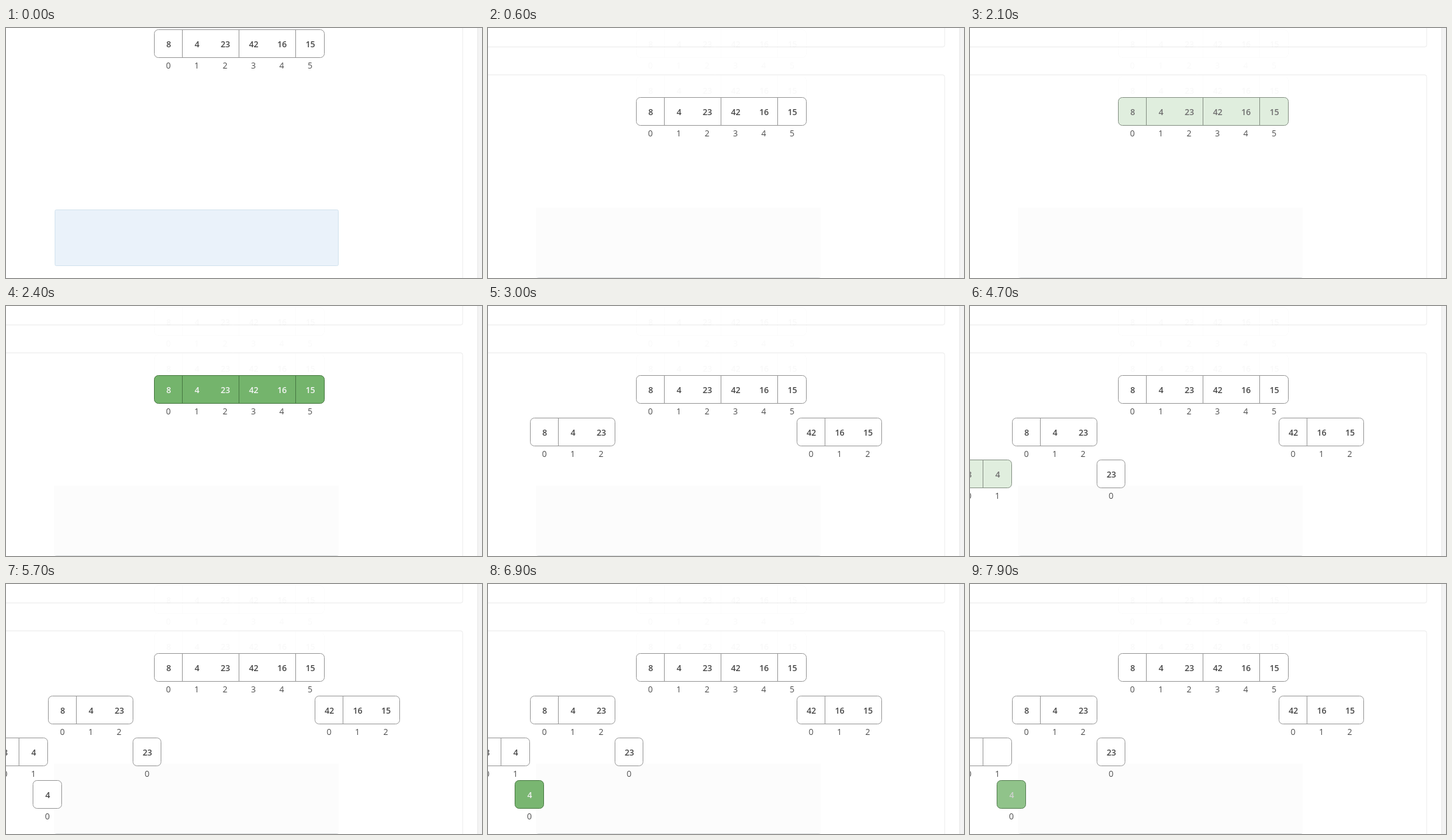
Write an HTML page with a canvas that moves like this. It is 714x376 px and loops after 8 s.

```html
<!DOCTYPE html>
<html lang="en">
<head>
<meta charset="utf-8">
<title>Merge sort</title>
<style>
  html, body { margin: 0; width: 100%; height: 100%; overflow: hidden; background: #fff; }
  canvas { display: block; }
</style>
</head>
<body>
<canvas id="stage" width="714" height="376"></canvas>
<script>
const ctx = document.getElementById('stage').getContext('2d');
const LOOP = 8000, CELL = 42.5;
const WHITE = [255, 255, 255], GREEN = [109, 176, 101];
const INK = [68, 68, 68], GRAY = [155, 155, 155], DARK_GREEN = [70, 122, 64];

// Each highlight is [start, end] of the fade in, then [start, end] of the fade out.
const arrays = [
  { values: [8, 4, 23, 42, 16, 15], x: 222.5, y: 104.5, shown: [-2, -1], lit: [2050, 2500, 2650, 3000] },
  { values: [8, 4, 23], x: 63.5, y: 168.5, shown: [2650, 3000], lit: [3250, 3700, 4150, 4400] },
  { values: [42, 16, 15], x: 463.5, y: 168.5, shown: [2650, 3000] },
  { values: [8, 4], x: -22.5, y: 231.5, shown: [4150, 4400], lit: [4650, 5100, 5450, 5700], emptied: [7250, 7600] },
  { values: [23], x: 190.5, y: 231.5, shown: [4150, 4400] },
  { values: [4], x: 40.95, y: 295.5, shown: [5450, 5700], lit: [6650, 7000, 7850, 8250] }
];

function ease(t, start, end) {
  const p = Math.min(1, Math.max(0, (t - start) / (end - start)));
  return 1 - (1 - p) ** 2;
}

const mix = (a, b, p) => `rgb(${a.map((v, i) => Math.round(v + (b[i] - v) * p))})`;

function roundedBox(x, y, w, h, r, fill, stroke) {
  ctx.beginPath();
  ctx.roundRect(x, y, w, h, r);
  ctx.fillStyle = fill;
  ctx.fill();
  ctx.strokeStyle = stroke;
  ctx.stroke();
}

function drawArray(item, y, alpha, glow, textAlpha) {
  if (alpha <= 0) return;
  const { values, x } = item;
  const edge = i => Math.floor(x + CELL * i - (i ? 0.1 : 0)) + 0.5;
  const left = edge(0);
  ctx.globalAlpha = alpha;
  roundedBox(left, y, edge(values.length) - left, 42, 6,
    mix(WHITE, GREEN, glow), mix(GRAY, DARK_GREEN, glow));

  ctx.beginPath();
  for (let i = 1; i < values.length; i += 2) {
    ctx.moveTo(edge(i), y);
    ctx.lineTo(edge(i), y + 42);
  }
  ctx.stroke();

  values.forEach((value, i) => {
    const center = x + CELL * (i + 0.5);
    ctx.font = '600 12.5px "Open Sans", sans-serif';
    ctx.fillStyle = mix(INK, WHITE, glow);
    ctx.globalAlpha = alpha * textAlpha;
    ctx.fillText(value, center + 0.3, y + 26.5);
    ctx.font = '12.5px "Open Sans", sans-serif';
    ctx.fillStyle = '#4c4c4c';
    ctx.globalAlpha = alpha;
    ctx.fillText(i, center - 0.2, y + 58);
  });
  ctx.globalAlpha = 1;
}

function drawPage(scroll) {
  ctx.fillStyle = '#fff';
  ctx.fillRect(0, 0, 714, 376);
  ctx.fillStyle = '#f3f3f3';
  ctx.fillRect(707, 0, 7, 376);
  ctx.fillStyle = '#e8e8e8';
  ctx.fillRect(707, 0, 1, 376);
  roundedBox(-20, scroll - 273.5, 705, 200, 3, '#fff', '#ebebeb');
  roundedBox(-20, scroll - 31.5, 705, 500, 3, '#fff', '#ebebeb');

  // Faint trail left behind by the scroll.
  if (scroll) {
    ctx.fillStyle = '#fcfcfc';
    ctx.fillRect(72, 270, 427, 106);
    drawArray(arrays[0], 2.5, 0.03, 0, 1);
    if (scroll > 70) drawArray(arrays[0], 72.5, 0.03, 0, 1);
  }
  roundedBox(73.5, 273.5 + scroll, 425, 84, 2, '#eaf2fa', scroll > 70 ? '#dcdfe1' : '#d3e3ee');
}

function draw(t) {
  const scroll = t < 500 ? 0 : t < 600 ? 70 : 102;
  ctx.lineWidth = 1;
  ctx.textAlign = 'center';
  drawPage(scroll);
  for (const item of arrays) {
    const { lit, emptied } = item;
    const glow = lit ? ease(t, lit[0], lit[1]) * (1 - ease(t, lit[2], lit[3])) : 0;
    const textAlpha = emptied ? 1 - ease(t, ...emptied) : 1;
    drawArray(item, item.y + scroll - 102, ease(t, ...item.shown), glow, textAlpha);
  }
}

const began = performance.now();
function tick() {
  draw((performance.now() - began) % LOOP);
  requestAnimationFrame(tick);
}
tick();
</script>
</body>
</html>
```
